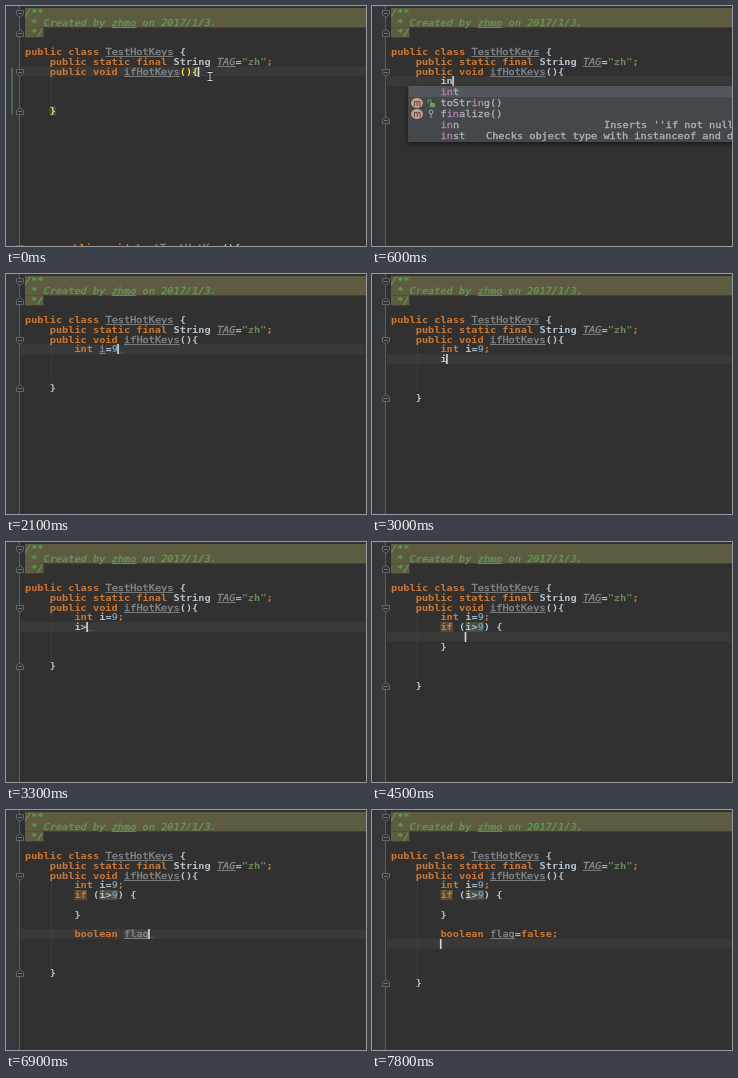
Animation of 360 by 240 pixels, one loop 8 s. Source, as an HTML page with a canvas:

```html
<!DOCTYPE html>
<html lang="en">
<head>
<meta charset="utf-8">
<title>Typing in a code editor</title>
<style>
html, body { margin: 0; width: 100%; height: 100%; overflow: hidden; background: #313131; }
canvas { display: block; width: 360px; height: 240px; }
</style>
</head>
<body>
<canvas id="stage" width="360" height="240"></canvas>
<script>
const ctx = document.getElementById("stage").getContext("2d");
const STEP = 300, LOOP = 8000;
const LEFT = 19, CHAR = 6.19, TOP = 7, LINE = 9.75;
const SQUASH = 0.84;

// style key: [colour, font style, underlined]
const STYLES = {
  k: ["#cc7832", "bold"],
  w: ["#b4c0cb", "bold"],
  u: ["#85888b", "", true],
  t: ["#85888b", "italic", true],
  s: ["#6a8759", "bold"],
  n: ["#6897bb", "bold"],
  d: ["#629755", "italic"],
  e: ["#629755", "italic", true],
  y: ["#f5d83c", "bold"],
  p: ["#b282b6", ""],
  g: ["#b0b3b5", ""]
};

const HEADER = [
  "d:/**",
  "d: * Created by |e:zhmo|d: on 2017/1/3.",
  "d: */",
  "",
  "k:public class |u:TestHotKeys|w: {",
  "k:    public static final |w:String |t:TAG|w:=|s:\"zh\"|k:;"
];
const METHOD = "k:    public void |u:ifHotKeys|w:(){";
const INT = "k:        int |w:i=|n:9|k:;";
const IF = "k:        if |w:(i>|n:9|w:) {";
const BOOL = "k:        boolean ";

// [caret row, text on that row, row of the method's closing brace]
const STEPS = [
  [6, "k:    public void |u:ifHotKeys|y:(){", 10],
  [7, "w:        ", 11],
  [7, "w:        in", 11],
  [7, "k:        int ", 11],
  [7, "k:        int |u:i", 11],
  [7, "k:        int |u:i", 11],
  [7, "k:        int |u:i|w:=", 11],
  [7, "k:        int |u:i|w:=|n:9", 11],
  [7, "k:        int |u:i|w:=|n:9|k:;", 11],
  [8, "w:        ", 12],
  [8, "w:        i", 12],
  [8, "w:        i>", 12],
  [8, "w:        i>|n:9", 12],
  [8, "w:        i>|n:9|w:.", 12],
  [8, "w:        i>|n:9|w:.|k:if", 12],
  [9, "w:            ", 14],
  [10, "y:        }", 14],
  [11, "w:        ", 15],
  [12, "w:        ", 16],
  [12, "w:        bo", 16],
  [12, "k:        boolean", 16],
  [12, BOOL, 16],
  [12, BOOL + "|u:f", 16],
  [12, BOOL + "|u:flag", 16],
  [12, BOOL + "|u:flag|w:=f", 16],
  [12, BOOL + "|u:flag|w:=|k:false;", 16],
  [13, "w:        ", 17]
];

const rowY = r => TOP + r * LINE;
const colX = c => LEFT + c * CHAR;

function box(x, y, w, h, color) {
  ctx.fillStyle = color;
  ctx.fillRect(x, y, w, h);
}

function path(points, color, width = 1) {
  ctx.strokeStyle = color;
  ctx.lineWidth = width;
  ctx.beginPath();
  points.forEach(([x, y], i) => i ? ctx.lineTo(x, y) : ctx.moveTo(x, y));
  ctx.stroke();
}

// Draws marked-up runs and returns the number of columns used.
function write(markup, x, y) {
  let col = 0;
  for (const run of markup ? markup.split("|") : []) {
    const [color, face, line] = STYLES[run[0]];
    const text = run.slice(2);
    const left = x + col * CHAR;
    ctx.save();
    ctx.translate(left, y + 3.2);
    ctx.scale(1, SQUASH);
    ctx.font = `${face} 10.28px "DejaVu Sans Mono", monospace`;
    ctx.fillStyle = ctx.strokeStyle = color;
    ctx.fillText(text, 0, 0);
    if (face !== "bold") {
      ctx.lineWidth = 0.35;
      ctx.strokeText(text, 0, 0);
    }
    ctx.restore();
    if (line) box(left, Math.round(y + 4), text.length * CHAR, 1, "#777a7b");
    col += text.length;
  }
  return col;
}

function fold(row, end) {
  const y = Math.round(rowY(row)) + 0.5, d = end ? -1 : 1;
  ctx.fillStyle = "#313335";
  const shape = [[10.5, y - 3 * d], [17.5, y - 3 * d], [17.5, y + d], [14, y + 4 * d], [10.5, y + d], [10.5, y - 3 * d]];
  ctx.beginPath();
  shape.forEach(p => ctx.lineTo(...p));
  ctx.fill();
  path(shape, "#636668");
  path([[12, y], [16, y]], "#707375");
}

function squiggle(x, row) {
  const y = rowY(row) + 4;
  path([[x, y], [x + 1.5, y - 1], [x + 3, y], [x + 4.5, y - 1]], "#a34a45", 0.8);
}

function scopeLine(from, to) {
  box(5.3, rowY(from) - 4, 1.4, (to - from) * LINE + 8, "#56766f");
}

function braceBox(col, row) {
  box(colX(col), rowY(row) - 4.5, CHAR, 9.5, "#3b514d");
}

function popup() {
  ctx.save();
  ctx.shadowColor = "rgba(0,0,0,.55)";
  ctx.shadowBlur = 5;
  ctx.shadowOffsetY = 2;
  box(36, 80, 330, 56, "#45484a");
  ctx.restore();
  box(37, 80, 323, 11, "#53565a");
  const rows = [
    "p:in|g:t",
    "g:toStr|p:in|g:g()",
    "g:f|p:in|g:alize()",
    "p:in|g:n",
    "p:in|g:st"
  ];
  rows.forEach((text, i) => write(text, 68.5, 86 + i * 11));
  write("g:Inserts ''if not null''", 232, 119);
  write("g:Checks object type with instanceof and downcasts", 114, 130);
  for (const y of [97, 108]) {
    ctx.fillStyle = "#c49c89";
    ctx.beginPath();
    ctx.ellipse(45, y, 6, 5, 0, 0, 7);
    ctx.fill();
    ctx.fillStyle = "#3d3431";
    ctx.font = '8px "DejaVu Sans", sans-serif';
    ctx.fillText("m", 41.2, y + 2.5);
  }
  box(58, 97, 5, 4, "#6b9d60");
  path([[56, 97], [56, 94], [59, 94], [59, 97]], "#6b9d60");
  ctx.strokeStyle = "#a5a7a8";
  ctx.beginPath();
  ctx.arc(59, 106, 2, 0, 7);
  ctx.stroke();
  path([[59, 108], [59, 112]], "#a5a7a8");
}

function mouse() {
  for (const [color, width] of [["#1c1c1c", 2.6], ["#d5d5d5", 1]]) {
    path([[201.5, 66.5], [206.5, 66.5]], color, width);
    path([[204, 66], [204, 74]], color, width);
    path([[201.5, 74.5], [206.5, 74.5]], color, width);
  }
}

function draw(step) {
  const [row, text, end] = STEPS[step];
  const hasIf = step >= 15;
  const lines = HEADER.concat(METHOD);
  if (row > 7) lines[7] = INT;
  if (hasIf) {
    lines[8] = step === 16 ? IF.replace("w:) {", "w:) |y:{") : IF;
    lines[10] = "w:        }";
  }
  if (row > 12) lines[12] = BOOL + "|u:flag|w:=|k:false;";
  lines[row] = text;
  lines[end] = step ? "w:    }" : "y:    }";

  box(0, 0, 360, 240, "#313131");
  box(0, 0, 13, 240, "#35383a");
  box(15, rowY(row) - 5, 345, 10, "#393939");
  box(19, 2, 341, 19.4, "#5d5b40");
  box(19, 21.4, 18.5, 10, "#5d5b40");
  box(13, 0, 1, 240, "#555b5f");
  for (let y = rowY(7) - 4; y < rowY(end) - 5; y += 2) box(45, y, 1, 1, "#484848");

  if (!step) {
    scopeLine(6, 10);
    braceBox(27, 6);
    braceBox(4, 10);
  }
  if (hasIf) {
    box(colX(8), rowY(8) - 5, CHAR * 2, 10, "#5b4a35");
    box(colX(12), rowY(8) - 5, CHAR * 3, 10, "#4c5044");
  }
  if (step === 16) {
    scopeLine(8, 10);
    braceBox(17, 8);
    braceBox(8, 10);
  }
  if (step === 23) box(colX(16), rowY(12) - 4.5, CHAR * 4, 9.5, "#424542");

  [0, 6].forEach(r => fold(r, false));
  [2, end].forEach(r => fold(r, true));

  let caretX = LEFT;
  lines.forEach((line, r) => {
    const cols = write(line, LEFT, rowY(r));
    if (r === row) caretX = colX(cols);
  });
  if (!step) {
    fold(24.1, false);
    write("k:public void |u:testTestHotKey|w:(){", 55, rowY(24.1));
  }
  if ([7, 11, 23].includes(step)) squiggle(caretX + 1, row);
  box(caretX - 0.6, Math.round(rowY(row)) - 5, 1.6, 10, "#d8d8d8");
  if (step === 2) popup();
  if (!step) mouse();
}

const start = performance.now();
function tick() {
  const t = Math.max(0, performance.now() - start) % LOOP;
  draw(Math.min(STEPS.length - 1, Math.floor(t / STEP)));
  requestAnimationFrame(tick);
}
tick();
</script>
</body>
</html>
```
